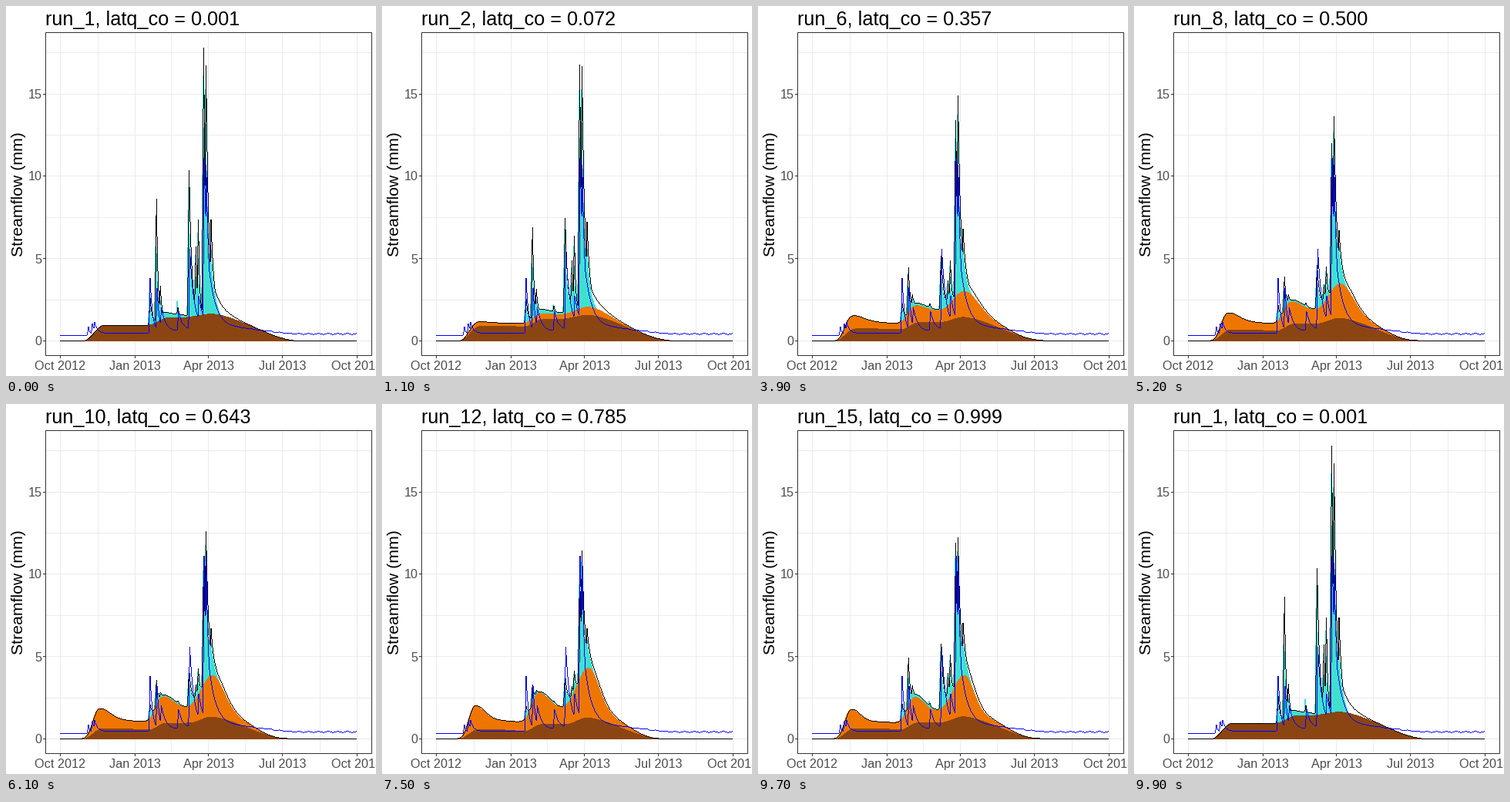
A matplotlib script for the animation above (10 s loop, 480 by 480 pixels).

```python
import numpy as np
import matplotlib.pyplot as plt
from matplotlib.animation import FuncAnimation
from matplotlib.patches import Rectangle

SIZE, DPI = 480, 100
PX = 72 / DPI
ZERO, UNIT = 434.5, 21.37  # stage y of zero flow, pixels per mm
LEFT, RIGHT, SUB = 70, 455, 10  # pixel columns of the curves, samples in each
RUNS, STEPS = 15, 3
STARTS = [4, 11, 18, 25, 32, 39, 46, 52, 59, 66, 73, 79, 85, 91, 97]

# Simulated storms: position, height in the first and a late run, decay, bend
STORMS = [
    (187, 1.6, .6, 2.6, 1), (195.3, 7.5, .9, 1.9, .85), (200.3, 2.1, .2, 2, 1),
    (203, .4, .05, 30, 1), (223, .6, .1, 2, 1), (237.6, 8.9, 1.6, 3.2, .6),
    (246.5, 4.2, .5, 1.6, .85), (249.6, 5.8, 1.05, 1.6, .85),
    (256.5, 16.2, 5.4, 2.6, 1.1), (259.5, 15.1, 6.2, 3.5, 1.55),
    (266, 5.7, 2.1, 3.8, 1), (270, 1.6, .15, 10, 1),
]
# Observed storms: position, height, decay
OBSERVED = [
    (107, .5, 1.5), (112, .6, 3), (115, .65, 3.5), (187, 3.3, 3.2),
    (196, 2.7, 2.8), (201.5, 1.5, 6), (223.8, 1.2, 5), (238.4, 4.9, 5.5),
    (250, 2, 6), (257, 10.3, 5), (259.7, 9.9, 3.8), (262, 4.2, 9),
]

plt.rcParams["font.family"] = "Liberation Sans"
edges = np.arange(LEFT, RIGHT + 1)
x = LEFT + np.arange((RIGHT - LEFT) * SUB) / SUB


def ease(start, end):
    t = np.clip((x - start) / (end - start), 0, 1)
    return t * t * (3 - 2 * t)


def hump(center, rise, fall):
    width = np.where(x < center, rise, fall)
    return np.exp(-((x - center) / width) ** 2)


def surge(pos, center, height, decay, rise=2.2):
    """Short linear rise, then an exponential recession."""
    d = pos - center
    return height * np.where(d < 0, np.clip(1 + d / rise, 0, 1),
                             np.exp(-np.maximum(d, 0) / decay))


def quick_flow(pos, q):
    return np.max([surge(pos, center, first * (late / first) ** q ** bend, decay)
                   for center, first, late, decay, bend in STORMS], axis=0)


def ground_flow(q):
    first = ((.95 * ease(100, 127) + .45 * ease(184, 210) + .24 * ease(225, 270))
             * (1 - ease(262, 380)))
    late = ((.5 * ease(100, 124) - .1 * ease(150, 185) + .4 * ease(186, 206)
             + .45 * ease(238, 268)) * (1 - ease(260, 360)))
    return first + (late - first) * q ** 0.8


def soil_flow(q):
    spread = 1.6 - 0.6 * q
    steady = 0.6 * ease(103, 120) * (1 - ease(280, 350))
    waves = (1.12 * hump(119, 11, 17 * spread) + 1.65 * hump(202, 12, 22 * spread)
             + 2.92 * hump(268, 23, 17 * spread))
    return steady * q ** 0.5 + waves * q


def flows(run):
    """Ground, ground + soil, all runoff, and simulated flow."""
    q = (run - 1) / 13
    ground = ground_flow(q)
    soil = ground + soil_flow(q)
    flash = np.exp(1 - run) * (surge(x, 186, 1.7, .5, 1) + surge(x, 222, 1.2, .5, 1))
    fast = quick_flow(x + 1, q) * (1 - ease(270, 280))
    simulated = np.interp(x - 1, x, soil) + quick_flow(x, q)
    return np.array([ground, soil, soil + fast + flash, simulated])


def observed_flow():
    base = (.33 + .14 * ease(104, 118) + .35 * ease(185, 280)
            - .4 * ease(285, 385) + .03 * np.sin(x / 2) * ease(300, 350))
    return base + np.max([surge(x, *storm, 1.6) for storm in OBSERVED], axis=0)


STATES = [flows(run) for run in range(1, RUNS + 1)]

fig = plt.figure(figsize=(SIZE / DPI, SIZE / DPI), dpi=DPI, facecolor="white")
ax = fig.add_axes([0, 0, 1, 1])
ax.set(xlim=(0, SIZE), ylim=(SIZE, 0))
ax.axis("off")


def to_columns(flow):
    return (ZERO - UNIT * flow).reshape(-1, SUB)


def set_columns(shape, top, bottom):
    """Cover whole pixels from top to bottom in every column."""
    xs = np.repeat(edges, 2)[1:-1]
    upper, lower = np.repeat(top, 2), np.repeat(bottom, 2)
    shape.set_xy(np.column_stack([np.r_[xs, xs[::-1]],
                                  np.r_[upper, lower[::-1]]]))


def set_area(shape, flow):
    top = np.floor(to_columns(flow).mean(axis=1))
    set_columns(shape, top, np.full_like(top, np.ceil(ZERO)))


def set_line(shape, flow):
    cols = to_columns(flow)
    following = np.append(cols[1:, 0], cols[-1, -1])
    cols = np.column_stack([cols, following])
    top = np.floor(cols.min(axis=1))
    set_columns(shape, top, np.maximum(np.floor(cols.max(axis=1)), top + 1))


def shape(color, zorder):
    return ax.fill([], [], color=color, lw=0, snap=False, zorder=zorder)[0]


def stroke(xs, ys, color, zorder):
    ax.plot(xs, ys, color=color, lw=PX, snap=False, zorder=zorder,
            solid_capstyle="butt")


def label(px, py, text, size, color="black", **kw):
    return ax.text(px, py, text, fontsize=size * PX, color=color, **kw)


for gx in (70.5, 119.5, 167.5, 214.5, 262.5, 310.5, 358.5, 407.5, 455.5):
    stroke([gx, gx], [35, 453], "#EBEBEB", 0)
for gy in (434.5, 381.5, 327.5, 274.5, 220.5, 167.5, 114.5, 60.5):
    stroke([52, 474], [gy, gy], "#EBEBEB", 0)

DATES = ["Oct 2012", "Jan 2013", "Apr 2013", "Jul 2013", "Oct 2013"]
for tx, date in zip((70.5, 167.5, 262.5, 358.5, 455.5), DATES):
    stroke([tx, tx], [454, 457], "#333333", 3)
    label(tx, 472, date, 16.2, "#4D4D4D", ha="center")
for ty, value in zip((434.5, 327.5, 220.5, 114.5), (0, 5, 10, 15)):
    stroke([48, 51], [ty, ty], "#333333", 3)
    label(46.5, ty + 6, str(value), 16.2, "#4D4D4D", ha="right")
label(16.5, 244.5, "Streamflow (mm)", 21.3, rotation=90, ha="center", va="center")
ax.add_patch(Rectangle((51.5, 34.5), 423, 419, fill=False, ec="#333333",
                       lw=PX, snap=False, zorder=4))

title = label(51, 25, "", 25.2)
runoff_area, soil_area, ground_area = (
    shape(color, 1) for color in ("#40E0D0", "#EE7600", "#8B4513"))
sim_line = shape("black", 2)
set_line(shape("blue", 2.5), observed_flow())


def update(n):
    passed = sum(start <= n for start in STARTS)
    here = there = part = 0
    if passed:
        here, there = passed - 1, passed % RUNS
        part = min((n - STARTS[here] + 1) / STEPS, 1)
    ground, soil, runoff, simulated = (
        STATES[here] + (STATES[there] - STATES[here]) * part)
    set_area(runoff_area, runoff)
    set_area(soil_area, soil)
    set_area(ground_area, ground)
    set_line(sim_line, simulated)
    nearest = there if part > 0.5 else here
    coef = 0.001 + nearest * 0.998 / (RUNS - 1)
    title.set_text(f"run_{nearest + 1}, latq_co = {coef:.3f}")
    return runoff_area, soil_area, ground_area, sim_line, title


anim = FuncAnimation(fig, update, frames=100, interval=100, repeat=True,
                     repeat_delay=0, blit=False)
plt.show()
```
